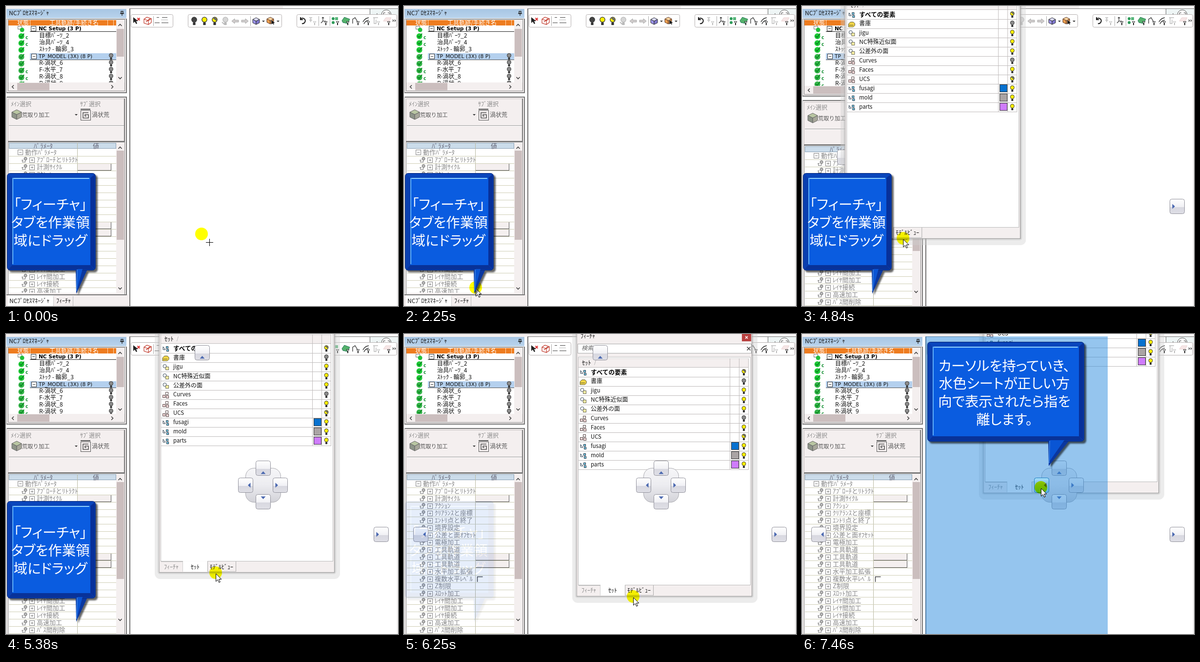
These frames come from a looping animation (804x616 px, 8000 ms). An HTML page:

```html
<!DOCTYPE html>
<html lang="ja">
<head>
<meta charset="utf-8">
<title>タブのドラッグ</title>
<style>
html, body { margin: 0; width: 100%; height: 100%; overflow: hidden; background: #fff; }
svg { display: block; }
text { font-family: "Noto Sans CJK JP", "Noto Sans CJK", "DejaVu Sans", sans-serif; white-space: pre; }
.ui { font-family: "DejaVu Sans", "Noto Sans CJK JP", sans-serif; }
.note { font-size: 28.4px; fill: #fff; text-anchor: middle; font-feature-settings: "palt"; }
.anim { animation: 8s linear infinite; }
.cut { animation: 8s step-end infinite; }

#ncDocked { animation-name: ncDocked; }
#featDocked { animation-name: featDocked; }
#ncAlone, #win { animation-name: afterDrag; }
#edges { animation-name: edges; }
#compassLeft { animation-name: compassLeft; }
#compassDoc { animation-name: compassDoc; }
#sheet { animation-name: sheet; }
#crossOn { animation-name: crossOn; }
#arrowOn { animation-name: arrowOn; }
#spot { animation: path 8s linear infinite, spotOn 8s step-end infinite; mix-blend-mode: multiply; }
#cross, #arrow { animation-name: path; }
#winMove { animation-name: drag; }
#note1 { animation-name: fadeOut; }
#note2 { animation-name: fadeIn; }

@keyframes ncDocked { 0% { visibility: visible } 38.875%, 100% { visibility: hidden } }
@keyframes featDocked { 0% { visibility: hidden } 38.875% { visibility: visible } 52.125%, 100% { visibility: hidden } }
@keyframes afterDrag { 0% { visibility: hidden } 52.125%, 100% { visibility: visible } }
@keyframes edges { 0% { visibility: hidden } 55%, 100% { visibility: visible } }
@keyframes compassLeft { 0% { visibility: hidden } 55% { visibility: visible } 62.375%, 100% { visibility: hidden } }
@keyframes compassDoc { 0% { visibility: hidden } 62.375%, 100% { visibility: visible } }
@keyframes sheet { 0% { visibility: hidden } 91.5%, 100% { visibility: visible } }
@keyframes crossOn { 0% { visibility: visible } 19.4%, 100% { visibility: hidden } }
@keyframes arrowOn { 0% { visibility: hidden } 19.4% { visibility: visible } 38.875% { visibility: hidden } 45.875%, 100% { visibility: visible } }
@keyframes spotOn { 0% { visibility: visible } 38.875% { visibility: hidden } 52.125%, 100% { visibility: visible } }
@keyframes fadeOut { 0%, 70.5% { opacity: 1 } 79%, 100% { opacity: 0 } }
@keyframes fadeIn { 0%, 83.1% { opacity: 0 } 92.3%, 100% { opacity: 1 } }
@keyframes path {
  0%, 13.24% { transform: translate(401px, 469px) }
  13.25% { transform: translate(399px, 469px) }
  15.25% { transform: translate(399px, 469px); animation-timing-function: ease-in-out }
  22.75%, 29.75% { transform: translate(147px, 579px) }
  29.76% { transform: translate(147px, 579px); animation-timing-function: ease-in-out }
  35.125%, 52.125% { transform: translate(118px, 608px) }
  60.5% { transform: translate(207px, 478px) }
  62% { transform: translate(246px, 475px) }
  67.25% { transform: translate(430px, 491px) }
  72.125% { transform: translate(462px, 528px) }
  78.125% { transform: translate(470px, 540px) }
  81.875% { transform: translate(485px, 532px) }
  83.125% { transform: translate(485px, 532px); animation-timing-function: ease-in-out }
  92.5%, 93.24% { transform: translate(490px, 323px) }
  93.25%, 100% { transform: translate(490px, 316px) }
}
@keyframes drag {
  0%, 52.125% { transform: translate(-352px, 68px) }
  60.5% { transform: translate(-266px, -61px) }
  62% { transform: translate(-226px, -65px) }
  67.25% { transform: translate(-40px, -49px) }
  72.125% { transform: translate(-8px, -12px) }
  78.125% { transform: translate(0, 0) }
  81.875% { transform: translate(15px, -8px) }
  83.125% { transform: translate(15px, -8px); animation-timing-function: ease-in-out }
  92.5%, 100% { transform: translate(18px, -212px) }
}
</style>
</head>
<body>
<svg id="stage" width="804" height="616" viewBox="0 0 804 616"></svg>
<script>
const UI = '#f4efef', THUMB = '#cbbebe', BLUE = '#4a68b0';

const rect = (x, y, w, h, fill, stroke, rx = 0) => {
  const o = stroke ? .5 : 0;
  return `<rect x="${x + o}" y="${y + o}" width="${w - 2 * o}" height="${h - 2 * o}" rx="${rx}" fill="${fill}" stroke="${stroke || 'none'}"/>`;
};
const path = (d, fill = 'none', stroke = 'none', sw = 1) =>
  `<path d="${d}" fill="${fill}" stroke="${stroke}" stroke-width="${sw}"/>`;
const dot = (x, y, r, fill, stroke = 'none') =>
  `<circle cx="${x}" cy="${y}" r="${r}" fill="${fill}" stroke="${stroke}"/>`;
const hline = (x1, x2, y, c) => rect(x1, y, x2 - x1, 1, c);
const vline = (x, y1, y2, c) => rect(x, y1, 1, y2 - y1, c);
const text = (x, y, s, size = 12, fill = '#111', more = '') =>
  `<text x="${x}" y="${y + size * .37}" font-size="${size}" fill="${fill}" ${more}>${s}</text>`;
const move = (x, y, s) => `<g transform="translate(${x} ${y})">${s}</g>`;
const clip = (x, y, w, h, s) =>
  `<svg x="${x}" y="${y}" width="${w}" height="${h}" viewBox="${x} ${y} ${w} ${h}">${s}</svg>`;
const group = (id, cls, s) => `<g id="${id}" class="${cls}">${s}</g>`;
const chevron = (x, y, turn) =>
  `<path d="M-3.5 2L0 -1.5L3.5 2" transform="translate(${x} ${y}) rotate(${turn})" fill="none" stroke="#444" stroke-width="1.6"/>`;
const cross = (x, y, r, c, sw = 1.6) =>
  path(`M${x - r} ${y - r}L${x + r} ${y + r}M${x + r} ${y - r}L${x - r} ${y + r}`, 'none', c, sw);
const pin = (x, y) => path(`M${x - 2} ${y - 4}h4v4h-4zM${x - 4} ${y + .5}h8M${x} ${y}v5`, 'none', '#222', 1.3);
const down = (x, y) => path(`M${x - 3} ${y - 1}h6l-3 3z`, '#333');

const bulb = (x, y, kind = 'y') => {
  const fill = { y: '#fff000', g: '#8c8c8c', h: '#fff000', k: '#444' }[kind];
  return dot(x, y - 1.5, 4, fill, '#333') +
    (kind === 'h' ? path(`M${x - 3} ${y - 4}L${x + 3} ${y + 1}A4 4 0 0 0 ${x - 3} ${y - 4}`, '#666') : '') +
    rect(x - 2, y + 3, 4, 4, '#333');
};
const cube = (x, y, s, a, b, c, line) =>
  path(`M${x} ${y - s}l${s} ${s / 2}l${-s} ${s / 2}l${-s} ${-s / 2}z`, a, line) +
  path(`M${x - s} ${y - s / 2}l${s} ${s / 2}v${s}l${-s} ${-s / 2}z`, b, line) +
  path(`M${x + s} ${y - s / 2}l${-s} ${s / 2}v${s}l${s} ${-s / 2}z`, c, line);
const plus = (x, y, c, open) => rect(x, y, 11, 11, '#fff', c) + hline(x + 3, x + 8, y + 5, c) +
  (open ? '' : vline(x + 5, y + 3, y + 8, c));

function titleBar(s) {
  return rect(1, 6, 246, 19, 'url(#bar)') + text(6, 15, s);
}

function scrollV(x, y, h, ty, th) {
  return rect(x, y, 16, h, UI) + rect(x + 1, ty, 15, th, THUMB) +
    chevron(x + 8, y + 11, 0) + chevron(x + 8, y + h - 10, 180);
}

// Operation tree
function tree() {
  let s = rect(5, 27, 221, 145, '#fff') + rect(5, 29, 221, 11, '#ee7c1f');
  for (const x of [49, 208, 220]) s += vline(x, 29, 40, '#ffd9b5');
  s += text(23, 35, '状態', 12, '#fff') + text(89, 35, '工具軌跡/手続き名', 12, '#fff');
  const names = ['', '目標ﾊﾟｰﾂ_2', '治具ﾊﾟｰﾂ_4', 'ｽﾄｯｸ - 輪郭_3', '', 'R-渦状_6', 'F-水平_7', 'R-渦状_8', 'R-渦状_9'];
  s += rect(49, 97, 177, 13, '#b4d0ee') + hline(49, 226, 110, '#555') + hline(49, 226, 52, '#222');
  names.forEach((n, i) => {
    const y = 46 + i * 14.1;
    if (!i) {
      s += rect(24, 41, 9, 7, '#fff', '#777') + dot(33, 49, 4.5, '#22c03a');
    } else {
      s += dot(31.5, y + 2, 6, i < 4 ? '#1fcb38' : '#37b54c') +
        path(`M28 ${y + 1}l3 3.5l6 -8`, 'none', '#0b8a22', 2);
      if ([1, 2, 6, 7, 8].includes(i)) s += text(40, y + 4, 'c', 10, '#0a8a2a', 'font-weight="bold"');
    }
    if (i > 3) s += bulb(215.5, y + .5, 'g');
    s += text(68, y, n, 12);
  });
  return s + plus(51, 41, '#333', true) + plus(52, 98, '#333', true) +
    text(67, 46, 'NC Setup (3 P)', 10.6, '#000', 'class="ui" font-weight="bold"') +
    text(67, 103.5, 'TP_MODEL (3X) (8 P)', 10.6, '#111', 'class="ui"');
}

const params = ['ｱﾌﾟﾛｰﾁとﾘﾄﾗｸﾄ', '計測ｻｲｸﾙ', 'ｱｸｼｮﾝ', 'ｸﾘｱﾗﾝｽと座標', 'ｴﾝﾄﾘ点と終了', '境界設定', '公差と面ｵﾌｾｯﾄ',
  '電極加工', '工具軌道', '工具軌道', '工具軌道', '水平加工拡張', '複数水平ﾚﾍﾞﾙ', 'Z制限', 'ｽﾛｯﾄ加工', 'ﾚｲﾔ間加工',
  'ﾚｲﾔ間加工', 'ﾚｲﾔ接続', '高速加工', 'ﾊﾟｽ間削除'];

function paramList() {
  const c = '#858585', grid = '#cfceb6';
  let s = rect(5, 280, 221, 340, '#fff') + rect(6, 281, 220, 12, '#cbdcea', '#8aa0b4') + vline(146, 281, 620, '#b9b9a2') +
    text(57, 287, 'ﾊﾟﾗﾒｰﾀ', 13, '#667') + text(178, 287, '値', 13, '#667') +
    plus(24, 295, c, true) + text(39, 300, '動作ﾊﾟﾗﾒｰﾀ', 13, c) + hline(6, 226, 308, grid);
  params.forEach((n, i) => {
    const y = 315 + 15 * i;
    s += hline(6, 226, y + 8, grid) + dot(40, y - 1.5, 3, '#bbb', '#666') +
      path(`M39.5 ${y + 1}v5M33 ${y + 5.5}h7M33.5 ${y + 1}v5M32 ${y + 1.5}h4`, 'none', '#777') +
      plus(48, y - 4, c) + text(63, y + .5, n, 13, c);
    if ([1, 9, 10].includes(i))
      s += rect(147, y - 6, 69, 13, UI) + hline(147, 216, y + 7, '#555') + vline(215, y - 6, y + 8, '#555');
    if (i === 12) s += rect(150, y - 4, 11, 11, '#fff') + path(`M150.5 ${y + 7}v-10.5h11`, 'none', '#444', 1.5);
  });
  return s;
}

// d: extra height once the bottom tab row is gone
function ncPanel(d) {
  const lower = rect(1, 186, 247, 440, UI) + rect(1, 186, 247, 2, '#777') + vline(1, 186, 626, '#bbb') +
    rect(246, 186, 2, d ? 440 : 408, '#777') +
    rect(4, 190, 240, 88, UI, '#c8c2c2') + rect(242, 190, 2, 88, '#777') + rect(4, 277, 240, 2, '#777') +
    text(10, 202, 'ﾒｲﾝ選択', 12, '#8a8a8a') + text(152, 202, 'ｻﾌﾞ選択', 12, '#8a8a8a') +
    cube(22, 223, 10, '#b9c6a2', '#8d9488', '#a7a79a', '#666') + text(33, 224, '荒取り加工', 11.3, '#555') +
    down(144, 223) + rect(153, 214, 21, 21, 'none', '#555') + path('M153 212h20', 'none', '#555', 2) +
    path('M169 219h-11v11h11v-7h-7v3h3', 'none', '#555', 1.6) + text(176, 224, '渦状荒', 12, '#555') +
    hline(6, 242, 245, '#999') + hline(6, 242, 246, '#fff') +
    rect(4, 279, 240, 340, UI, '#888') +
    clip(5, 280, 221, d ? 340 : 309, paramList()) +
    scrollV(226, 280, 310, 297, d ? 199 : 183);
  let s = rect(0, 0, 252, 616, '#fff') + rect(0, 0, 252, 6, UI) + titleBar('NCﾌﾟﾛｾｽﾏﾈｰｼﾞｬ') + pin(238, 15) +
    rect(1, 26, 247, 153 + d, UI, '#999') + rect(4, 27, 240, 148 + d, '#fff', '#888') +
    clip(5, 28, 221, 129 + d, tree()) +
    scrollV(226, 28, 130 + d, 47, d ? 62 : 57) +
    move(0, d, rect(5, 157, 238, 17, UI) + rect(23, 158, 66, 15, THUMB) + chevron(14, 166, -90) + chevron(218, 166, 90) +
      rect(1, 177, 247, 2, '#777')) + rect(246, 26, 2, 152 + d, '#777') + move(0, d, lower);
  if (!d) s += rect(0, 592, 252, 24, UI) + rect(1, 592, 247, 2, '#777') + rect(4, 594, 93, 22, '#fff') + vline(97, 596, 616, '#ccc') +
    vline(137, 596, 616, '#bbb') + text(7, 606, 'NCﾌﾟﾛｾｽﾏﾈｰｼﾞｬ') + text(103, 606, 'ﾌｨｰﾁｬ');
  return s;
}

// Set list: label, icon kind, bulb kind, swatch
const sets = [['すべての要素', 0, 'h'], ['書庫', 1, 'g'], ['jigu', 2, 'y'], ['NC特殊近似面', 2, 'y'], ['公差外の面', 2, 'y'],
  ['Curves', 3, 'g'], ['Faces', 3, 'y'], ['UCS', 3, 'h'], ['fusagi', 0, 'y', '#0872d0'], ['mold', 0, 'y', '#aaa4a4'],
  ['parts', 0, 'y', '#cf7cfc']];
const setIcons = [
  y => path(`M4 ${y - 3}v6l5 0z`, '#fff', '#234') + rect(10, y - 4, 5, 5, '#7fd4ee', '#234') + rect(11, y + 2, 5, 5, '#7fd4ee', '#234'),
  y => path(`M3 ${y + 1}l4 -4h6l3 3v4l-3 3h-10z`, '#f3d648', '#553') + hline(4, 13, y + 3, '#553'),
  y => dot(7.5, y - 1, 3.5, '#fff', '#345') + rect(9, y, 7, 7, '#fdf3a5', '#665'),
  y => rect(9, y - 5, 6, 6, '#fff', '#544') + rect(3, y + 1, 6, 6, '#f6dcdc', '#544') + rect(10, y + 2, 6, 6, '#f6dcdc', '#544')
];

function setList(w) {
  const c = '#bfbbbb';
  let s = rect(0, 0, w, 18, UI) + hline(0, w, 0, '#d8d4d4') + hline(0, w, 18, c) +
    text(7, 9, 'ｾｯﾄ', 12.5) + text(32, 8, '/', 10, '#999');
  for (const x of [w - 38, w - 19, w]) s += vline(x, 0, 229, c);
  sets.forEach(([name, icon, lamp, color], i) => {
    const y = 28 + 19 * i, latin = /^[A-Za-z]+$/.test(name);
    s += hline(0, w, y + 10, c) + setIcons[icon](y) + bulb(w - 9, y, lamp) +
      (i ? text(25, y, name, latin ? 11.3 : 12) : text(25, y, name, 12.6, '#000', 'font-weight="bold"'));
    if (color) s += rect(w - 35, y - 8, 16, 16, color, '#333');
  });
  return s;
}

// Row of page tabs below a set list
const pageTabs = y => hline(0, 45, y, '#bbb') + text(6, y + 11, 'ﾌｨｰﾁｬ', 12, '#888') + vline(44, y, y + 21, '#ccc') +
  rect(45, y - 1, 50, 22, '#fff') + text(61, y + 11, 'ｾｯﾄ', 12) + vline(95, y, y + 21, '#aaa') +
  text(100, y + 11, 'ﾓﾃﾞﾙﾋﾞｭｰ') + vline(153, y, y + 21, '#aaa') + hline(95, 153, y + 20, '#bbb');

function featurePanel() {
  return rect(0, 0, 252, 616, UI) + titleBar('ﾌｨｰﾁｬ') + pin(222, 15) + cross(239, 15, 3, '#222') +
    rect(3, 26, 245, 20, '#fff', '#999') + text(11, 34, '検索', 12, '#666', 'font-style="italic"') + cross(241, 35, 3.5, '#444') +
    rect(4, 52, 242, 519, '#fff', '#c4c0c0') + move(5, 55, setList(236)) + move(5, 0, pageTabs(571)) +
    rect(0, 594, 252, 22, UI) + text(9, 606, 'NCﾌﾟﾛｾｽﾏﾈｰｼﾞｬ') + rect(96, 594, 44, 22, '#fff') +
    vline(95, 595, 616, '#bbb') + vline(140, 595, 616, '#bbb') + text(101, 606, 'ﾌｨｰﾁｬ');
}

function floatWindow() {
  return `<rect x="345" y="-18" width="380" height="570" rx="11" fill="#cfcfcf" opacity=".4"/>` +
    `<rect x="351" y="-12" width="366" height="554" rx="5" fill="#a9a9a9" opacity=".3"/>` +
    rect(354, -9, 360, 548, UI, '#b4b0b0') + vline(713, -9, 539, '#999') + hline(354, 714, 538, '#999') +
    text(362, 5, 'ﾌｨｰﾁｬ') + rect(693, -5, 19, 20, '#b8403f') + cross(702.5, 7, 2.5, '#fff') +
    rect(356, 20, 357, 20, '#fff', '#aaa') + text(364, 29, '検索', 12, '#666', 'font-style="italic"') + cross(707, 30, 3.5, '#444') +
    rect(357, 47, 354, 469, '#fff', '#bbb') + move(358, 50, setList(348)) + move(358, 0, pageTabs(516));
}

// Docking guides: turn 0 up, 90 right, 180 down, 270 left
function guide(x, y, turn, skin = 'url(#key)', edge = '#92929c') {
  const a = (turn - 90) * Math.PI / 180, k = turn === 0 ? 9 : turn === 180 ? 8 : 7;
  return rect(x, y, 31, 31, skin, edge, 4) +
    `<path d="M-5 3L0 -2.5L5 3z" fill="${BLUE}" transform="translate(${x + 15.5 - Math.cos(a) * k} ${y + 15.5 - Math.sin(a) * k}) rotate(${turn})"/>`;
}
const compass = (x, y) => rect(x - 36, y - 35, 73, 71, 'url(#plate)', '#a8a8ae', 17) +
  guide(x - 15, y - 50, 0) + guide(x - 15, y + 19, 180) + guide(x - 51, y - 15, 270) + guide(x + 20, y - 15, 90);

const funnel = (x, y, c = '#222') => path(`M${x - 3} ${y}h6l-2.5 3v4h-1v-4z`, '#fff', c);

function workArea() {
  const bar = (x, w) => rect(x, 17, w, 27, '#fff', '#b5b0b0', 3), sep = x => vline(x, 21, 41, '#aaa');
  const arrow = (x, s) => path(`M${x - 7 * s} 31l${6 * s} -5v3h${8 * s}v4h${-8 * s}v3z`, '#d0cccc', '#aaa');
  return rect(249, 0, 555, 5, '#f2eeee') + rect(568, 0, 236, 5, '#fbf9f9') + hline(252, 804, 5, '#777') +
    rect(247, 0, 6, 616, UI) + rect(253, 5, 2, 611, '#777') + vline(802, 6, 616, '#e2dede') +
    rect(747, 6, 57, 12, '#eef5f5') + vline(746, 6, 18, '#666') + dot(780, 18, 10, '#fff', '#555') +
    path('M758 18h7M761 15v4M774 17v-3h4M783 14h4v3', 'none', '#444') +
    bar(256, 87) + path('M261 23v12l3 -3l3 5l2 -1l-2 -5h4z', '#222') + cross(272, 27, 2.5, '#d33', 1.8) +
    path('M283 27l6 -4l9 3v8l-6 4l-9 -3zM283 27l9 3l6 -4M292 30v8M287 33l8 -7', 'none', '#c0392b', 1.2) + sep(302) +
    path('M309 23.5h5M320 23.5h11M305 34.5h10M319 34.5h14', 'none', '#444') + hline(318, 332, 28, '#bbb') +
    bar(373, 193) + [[386, 'k'], [407, 'y'], [428, 'h']].map(([x, k]) =>
      `<g transform="translate(${x} 30) scale(1.3)">${bulb(0, 0, k)}</g>`).join('') +
    `<g opacity=".35" transform="translate(450 30) scale(1.3)">${bulb(0, 0, 'g')}</g>` + path('M443 33l4 4h5', 'none', '#bbb', 2) +
    arrow(470, 1) + arrow(490, -1) + sep(501) +
    cube(513, 31, 7, '#dcdcff', '#9a92e6', '#7e76cf', '#333') + down(528, 31) +
    cube(542, 30, 7, '#ffd6a0', '#f0a050', '#d98535', '#532') + path('M544 28v10l3 -2l2 3l1 -1l-1 -3h3z', '#111', '#fff', .5) + down(558, 31) +
    bar(596, 206) + path('M604 27a5.5 5.5 0 1 1 3 9M604 23v5h5', 'none', '#222', 2) +
    path('M622 24h6M625 24v9M622 29h6', 'none', '#bbb', 1.5) + funnel(633, 32, '#bbb') + sep(641) +
    path('M650 23v8h6M650 31l-4 4M648 25l2 -2l2 2', 'none', '#333', 1.2) + funnel(656, 32) + sep(664) +
    dot(671, 26, 3, '#2f9c5a') + dot(671, 34, 3, '#2f9c5a') + rect(675, 23, 6, 6, '#59b77c') + funnel(680, 32) +
    path('M689 30l5 -7l11 4l-4 9l-10 -2z', '#55b26c', '#275') + funnel(701, 32) +
    path('M711 36v-9l5 -3l6 10', 'none', '#333', 1.3) + funnel(722, 32) +
    path('M732 33q4 -8 12 -9M734 37q3 -7 10 -8', 'none', '#333', 1.3) + funnel(743, 32) +
    path('M753 24h10M755 24v12h4v-8', 'none', '#bbb', 1.4) + funnel(764, 32, '#bbb') +
    path('M774 31l5 -7h11l-4 7z', '#f6e6e6', '#ead2d2') + funnel(785, 32) +
    path('M793 28l2 2l-2 2M797 28l2 2l-2 2', 'none', '#333', 1.2);
}

// The tail hangs from x1..x2 on the lower edge down to (tx, ty)
function callout(x, y, w, h, [x1, x2, tx, ty], cx, lines) {
  const r = x + w, b = y + h, tail = `M${x1} ${b - 2}L${tx} ${ty}L${x2} ${b - 2}z`;
  return `<g filter="url(#soft)" opacity=".6">${rect(x + 4, y + 4, w, h, '#000', '', 6)}${move(4, 3, path(tail, '#000'))}</g>` +
    path(tail, '#0a37a0') + rect(x, y, w, h, '#0a3fb0', '#06297c', 6) +
    path(`M${x + 3} ${y + 2}H${r - 3}L${r - 12} ${y + 11}H${x + 12}z`, '#0a46bc') +
    path(`M${r - 2} ${y + 3}V${b - 3}L${r - 12} ${b - 12}V${y + 11}z`, '#07309a') +
    path(`M${x + 3} ${b - 2}H${r - 3}L${r - 12} ${b - 12}H${x + 12}z`, '#083299') +
    rect(x + 11, y + 10, w - 22, h - 21, '#0a5ce0') +
    path(`M${x1 + 4} ${b - 3}L${tx + 2} ${ty - 10}L${x2 - 10} ${b - 3}z`, '#0a55d4') +
    path(`M${x1 + 3} ${b - 2}L${tx + 1} ${ty - 6}`, 'none', '#3f8cf0', 1.5) +
    path(`M${x + 12} ${b - 13}V${y + 11}H${r - 13}`, 'none', '#5fb0fa', 2) +
    path(`M${x + 14} ${y + 11}H${r - 14}`, 'none', '#a5e0ff', 1.5) +
    lines.map(([cy, s]) => `<text class="note" x="${cx}" y="${cy + 9.5}">${s}</text>`).join('');
}

const defs = `<defs>
  <linearGradient id="bar" x2="0" y2="1"><stop stop-color="#a7c6e4"/><stop offset="1" stop-color="#b9d3ec"/></linearGradient>
  <linearGradient id="key" x2="0" y2="1"><stop stop-color="#fff"/><stop offset=".55" stop-color="#f0f0f4"/><stop offset=".56" stop-color="#d8d8e0"/><stop offset="1" stop-color="#dfdfe6"/></linearGradient>
  <linearGradient id="plate" x2="0" y2="1"><stop stop-color="#f6f6f8"/><stop offset=".5" stop-color="#ececf0"/><stop offset="1" stop-color="#d2d2d8"/></linearGradient>
  <linearGradient id="hot" x2="0" y2="1"><stop stop-color="#a8e2fb"/><stop offset=".35" stop-color="#84bfe6"/><stop offset="1" stop-color="#5db2e4"/></linearGradient>
  <filter id="soft" x="-10%" y="-10%" width="120%" height="125%"><feGaussianBlur stdDeviation="1.6"/></filter>
</defs>`;

document.getElementById('stage').innerHTML = defs + rect(0, 0, 804, 616, '#fff') + workArea() +
  group('ncDocked', 'cut', ncPanel(0)) +
  group('featDocked', 'cut', featurePanel()) +
  group('ncAlone', 'cut', ncPanel(7)) +
  group('edges', 'cut', guide(19, 396, 270) + guide(754, 396, 90)) +
  group('compassLeft', 'cut', compass(123, 310)) +
  group('win', 'cut', group('winMove', 'anim', floatWindow())) +
  group('compassDoc', 'cut', guide(387, 23, 0) + compass(527, 310)) +
  group('sheet', 'cut', '<rect x="253" y="5" width="374" height="611" fill="#2c8cde" opacity=".5"/>' +
    guide(476, 295, 270, 'url(#hot)', '#1c7fc4')) +
  '<circle id="spot" cy="-1" r="13" fill="#ff0"/>' +
  group('crossOn', 'cut', group('cross', 'anim', path('M9 16.5h15M16.5 9v15', 'none', '#000'))) +
  group('arrowOn', 'cut', group('arrow', 'anim', path('M.5 1v16l3.7 -3.5l2.6 5.6l2.4 -1.1l-2.5 -5.5h5z', '#fff', '#000'))) +
  group('note1', 'anim', callout(2, 343, 182, 200, [143, 167, 144, 591], 91,
    [[408, '「フィーチャ」'], [445, 'タブを作業領'], [482, '域にドラッグ']])) +
  group('note2', 'anim', callout(257, 16, 322, 205, [505, 548, 506, 271], 415,
    [[66, 'カーソルを持っていき、'], [102, '水色シートが正しい方'], [139, '向で表示されたら指を'], [176, '離します。']]));
</script>
</body>
</html>
```
